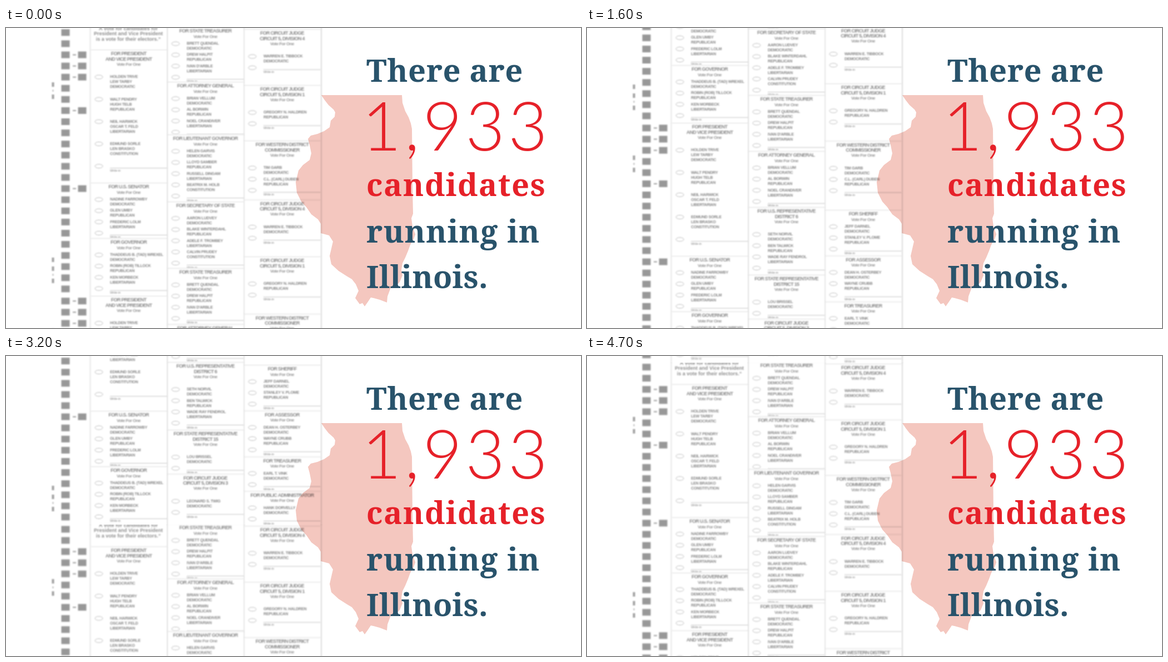
An HTML page with a canvas for the animation above (4.8 s loop, 1034x541 px).

```html
<!DOCTYPE html>
<html lang="en">
<head>
<meta charset="utf-8">
<title>Candidates</title>
<style>
  html, body { margin: 0; width: 100%; height: 100%; overflow: hidden; background: #fff; }
  canvas, svg { position: absolute; left: 0; top: 0; width: 1034px; height: 541px; }
  svg { mix-blend-mode: multiply; }
  .line { font: 700 56px "Noto Serif", serif; fill: #29536b; }
  .count { font: 300 122px Lato, sans-serif; letter-spacing: 6px; }
  .red { fill: #e62129; }
</style>
</head>
<body>
<canvas id="stage" width="1034" height="541"></canvas>
<svg viewBox="0 0 1034 541">
  <path fill="#f4c7bf" d="M567 121 L712 121 L713 135 L718 150 L724 161 L728 172 L730 182 L731 290 L732 335
    L729 343 L731 358 L736 372 L733 381 L727 391 L723 402 L718 414 L713 424 L711 436 L713 446 L708 458
    L702 464 L692 468 L689 476 L686 484 L685 495 L672 490 L661 487 L656 486 L650 495 L645 502 L641 496
    L636 498 L628 487 L634 474 L629 462 L622 453 L612 447 L598 438 L585 426 L582 411 L585 398
    L588 385 L581 374 L566 370 L566 353 L561 345 L549 336 L540 323 L531 313 L523 297 L521 278
    L526 257 L534 247 L546 238 L549 226 L546 211 L543 200 L548 194 L560 191 L572 186 L582 179
    L584 167 L591 160 L592 152 L589 147 L580 139 L573 130 Z"/>
  <text class="line" x="648" y="97" letter-spacing="0.6">There are</text>
  <text class="count red" x="640" y="221">1,933</text>
  <text class="line red" x="648" y="303" letter-spacing="1.5">candidates</text>
  <text class="line" x="648" y="387" letter-spacing="1.1">running in</text>
  <text class="line" x="648" y="469" letter-spacing="0.2">Illinois.</text>
</svg>
<script>
const LOOP = 4800, STEP = 100, PERIOD = 928.3, SPEED = 19.5, FORM = 444;
const SANS = '"Liberation Sans", Arial, sans-serif';
const PARTIES = ['DEMOCRATIC', 'REPUBLICAN', 'LIBERTARIAN', 'CONSTITUTION'];

const president = ['HOLDEN TRIVE/LEW TARBY', 'WALT PENDRY/HUGH TELB', 'NEIL HARWICK/OSCAR T. FELD', 'EDMUND SORLE/LEN BRASKO'];
const senator = ['NADINE FARROWBY', 'GLEN UMBY', 'FREDERIC LOLM'];
const governor = ['THADDEUS B. (TAD) WREXEL', 'ROBIN (ROB) TILLOCK', 'KEN MORBECK'];
const treasurer = ['BRETT QUENDAL', 'DREW HALPIT', "IVAN D'ARBLE"];
const attorney = ['BRIAN VELLUM', 'AL BORWIN', 'NOEL CRANDIVER'];
const western = ['TIM GARB', 'C.L. (CARL) DUBEN'];
const judge = n => 'FOR CIRCUIT JUDGE/CIRCUIT 5, DIVISION ' + n;
const westernTitle = 'FOR WESTERN DISTRICT/COMMISSIONER';

// Each race: top line, title, names, index of the first party
const form = y => [
  [y + 47, 'FOR PRESIDENT/AND VICE PRESIDENT', president],
  [y + 287, 'FOR U.S. SENATOR', senator],
  [y + 387, 'FOR GOVERNOR', governor]
];
const columns = [
  { x: 152, races: [...form(0), ...form(FORM)] },
  { x: 290, races: [
    [6, 'FOR STATE TREASURER', treasurer],
    [105, 'FOR ATTORNEY GENERAL', attorney],
    [200, 'FOR LIEUTENANT GOVERNOR', ['HELEN GARVIS', 'LLOYD SAMBER', 'RUSSELL DINGAM', 'BEATRIX M. HOLB']],
    [321, 'FOR SECRETARY OF STATE', ['AARON LUDVEY', 'BLAKE WINTERDAHL', 'ADELE F. TROMBEY', 'CALVIN PRUDEY']],
    [441, 'FOR STATE TREASURER', treasurer],
    [542, 'FOR ATTORNEY GENERAL', attorney],
    [643, 'FOR U.S. REPRESENTATIVE/DISTRICT 6', ['SETH NORVIL', 'BEN TALWICK', 'WADE RAY FENDROL']],
    [765, 'FOR STATE REPRESENTATIVE/DISTRICT 15', ['LOU BRISSEL']],
    [844.5, judge(3), ['LEONARD S. TWIG']]
  ] },
  { x: 428, races: [
    [10, judge(4), ['WARREN E. TIBBOCK']],
    [111, judge(1), ['GREGORY N. HALDREN'], 1],
    [211, westernTitle, western],
    [317.5, judge(4), ['WARREN E. TIBBOCK']],
    [420, judge(1), ['GREGORY N. HALDREN'], 1],
    [523.5, westernTitle, western],
    [648, 'FOR SHERIFF', ['JEFF DARNEL', 'STANLEY V. PLOME']],
    [730.5, 'FOR ASSESSOR', ['DEAN H. OSTERBEY', 'WAYNE CRUBB']],
    [813.5, 'FOR TREASURER', ['EARL T. VINK']],
    [875.5, 'FOR PUBLIC ADMINISTRATOR', ['HANK DORVELLY']]
  ] }
];

const strip = document.createElement('canvas');
strip.width = 580;
strip.height = 929;
const g = strip.getContext('2d');

function label(text, x, y, font, spacing, color, align = 'left') {
  g.font = font + ' ' + SANS;
  g.letterSpacing = spacing + 'px';
  g.textAlign = align;
  g.fillStyle = color;
  g.fillText(text, x, y);
}

function box(x, y, w, h, color) {
  g.fillStyle = color;
  g.fillRect(x, y, w, h);
}

function oval(x, y) {
  g.strokeStyle = '#bcbcbc';
  g.lineWidth = 1;
  g.beginPath();
  g.ellipse(x, y, 7, 3.5, 0, 0, Math.PI * 2);
  g.stroke();
}

function drawRace(left, [top, title, names, firstParty = 0]) {
  const lines = title.split('/'), mid = left + 68.5;
  box(left, top - 8, 138, 14, '#fff');
  box(left, top - 8, 138, 1, '#dedede');
  lines.forEach((t, i) => label(t, mid, top + i * 9.4, 'bold 9px', -0.75, '#8a8a8a', 'center'));
  const vote = top + lines.length * 9.3;
  label('Vote For One', mid, vote, 'bold 8px', -0.55, '#959595', 'center');

  let y = vote + (lines.length > 1 ? 22.8 : 13);
  names.forEach((entry, i) => {
    const rows = [...entry.split('/'), PARTIES[firstParty + i]];
    oval(left + 15, y);
    rows.forEach((t, k) => label(t, left + 35, y + k * 9, 'bold 7.2px', -0.3, '#858585'));
    y += rows.length > 2 ? 40.2 : 20.2;
  });
  oval(left + 15, y);
  box(left + 35, y + 3, 103, 1, '#c4c4c4');
  label('Write-in', left + 35, y + 8, 'italic 5.5px', 0, '#777');
}

function drawMarks(base) {
  for (let i = base ? 2 : 0; i < 24; i++) {
    const y = base + 8.2 + i * 20.1;
    box(99.5, y - 6, 15, 12, '#989898');
    if ([2, 3, 4, 7, 14].includes(i)) {
      box(129.5, y - 6, 15, 12, '#989898');
      box(120, y - 1, 6, 2, '#a0a0a0');
    }
  }
  for (const y of [102, 124, 418, 434, 456]) box(82.5, base + y - 4, 4, 8, '#a0a0a0');
  for (const y of [113, 445]) box(83.5, base + y - 1.5, 2, 3, '#b0b0b0');
}

function drawStrip() {
  g.filter = 'blur(0.9px)';
  g.textBaseline = 'middle';
  ['A vote for candidates for', 'President and Vice President', 'is a vote for their electors.”']
    .forEach((t, i) => label(t, 220, 1.5 + i * 9.4, 'bold 9px', 0, '#8c8c8c', 'center'));
  for (const { x, races } of columns) races.forEach(r => drawRace(x, r));
  drawMarks(0);
  drawMarks(FORM);
  box(150.5, -5, 2, 940, '#e8e8e8');
  box(289.5, -5, 1.5, 940, '#d8d8d8');
  box(427.5, -5, 1.5, 940, '#dedede');
  box(566, -5, 2, 940, '#dedede');
}

const ctx = document.getElementById('stage').getContext('2d');

function render(now) {
  const shift = Math.floor((now % LOOP) / STEP) * SPEED;
  ctx.fillStyle = '#fff';
  ctx.fillRect(0, 0, 1034, 541);
  ctx.drawImage(strip, 0, -shift);
  ctx.drawImage(strip, 0, PERIOD - shift);
}

drawStrip();
const start = performance.now();
function tick() {
  render(performance.now() - start);
  requestAnimationFrame(tick);
}
tick();
</script>
</body>
</html>
```
